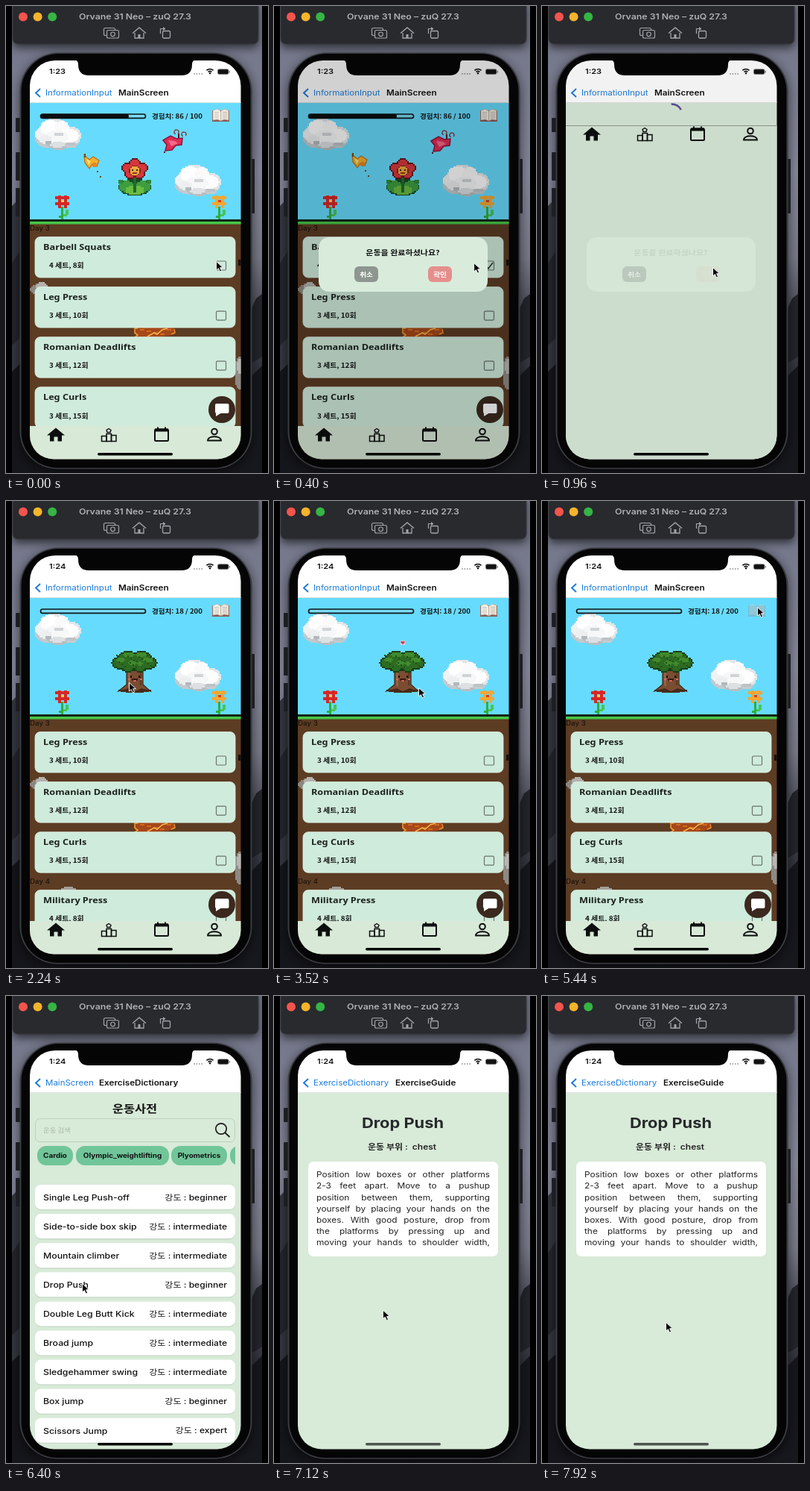
Write an HTML page with a canvas that moves like this. It is 352x626 px and loops after 8000 ms.

```html
<!DOCTYPE html>
<html lang="ko">
<head>
<meta charset="utf-8">
<title>Workout garden</title>
<style>
html, body { margin: 0; width: 100%; height: 100%; overflow: hidden; background: #000; }
canvas { display: block; width: 352px; height: 626px; }
</style>
</head>
<body>
<canvas id="stage" width="352" height="626"></canvas>
<script>
const ctx = document.getElementById('stage').getContext('2d');
const LOOP = 8000, WIDE = 1.15;
const SANS = 'Inter, "Noto Sans CJK KR", "Noto Sans CJK", sans-serif';
const ROUND = '"Noto Sans", "Noto Sans CJK KR", sans-serif';
const KO = '"Noto Sans CJK KR", "Noto Sans CJK", sans-serif';
const MINT = '#d8e9d8';

const clamp = v => Math.max(0, Math.min(1, v));
const ramp = (t, a, b) => clamp((t - a) / (b - a));
const smooth = p => p * p * (3 - 2 * p);
const easeOut = p => 1 - (1 - p) ** 3;

// ---- drawing helpers
function rect(x, y, w, h, c) { ctx.fillStyle = c; ctx.fillRect(x, y, w, h); }

function round(x, y, w, h, r, fill, stroke, lw = 1) {
  ctx.beginPath();
  ctx.roundRect(x, y, w, h, r);
  if (fill) { ctx.fillStyle = fill; ctx.fill(); }
  if (stroke) { ctx.strokeStyle = stroke; ctx.lineWidth = lw; ctx.stroke(); }
}

function disc(x, y, r, c) {
  ctx.beginPath(); ctx.arc(x, y, r, 0, 7); ctx.fillStyle = c; ctx.fill();
}

function poly(pts, fill, stroke, lw = 1, close = true) {
  ctx.beginPath();
  for (let i = 0; i < pts.length; i += 2) ctx.lineTo(pts[i], pts[i + 1]);
  if (close) ctx.closePath();
  if (fill) { ctx.fillStyle = fill; ctx.fill(); }
  if (stroke) { ctx.strokeStyle = stroke; ctx.lineWidth = lw; ctx.stroke(); }
}

function text(s, x, y, size, { w = 400, c = '#111', f = SANS, al = 'left' } = {}) {
  ctx.save();
  ctx.translate(x, y);
  ctx.scale(WIDE, 1);
  ctx.font = `${w} ${size}px ${f}`;
  ctx.textAlign = al;
  ctx.textBaseline = 'middle';
  ctx.fillStyle = c;
  ctx.fillText(s, 0, 0.5);
  ctx.restore();
}

function faded(a, fn) {
  if (a <= 0) return;
  ctx.save(); ctx.globalAlpha *= a; fn(); ctx.restore();
}

function shadowed(blur, fn) {
  ctx.save();
  ctx.shadowColor = 'rgba(0,0,0,0.6)';
  ctx.shadowBlur = blur;
  ctx.shadowOffsetY = 5;
  fn();
  ctx.restore();
}

// Ellipse built from square steps.
function blob(cx, cy, rx, ry, c, s = 2) {
  ctx.fillStyle = c;
  for (let y = -ry; y < ry; y += s) {
    const k = (y + s / 2) / ry;
    const hw = Math.round(rx * Math.sqrt(Math.max(0, 1 - k * k)) / s) * s;
    ctx.fillRect(cx - hw, cy + y, hw * 2, s);
  }
}

// ---- desktop and simulator frame
function desktop() {
  const g = ctx.createLinearGradient(0, 50, 0, 626);
  g.addColorStop(0, '#74778a');
  g.addColorStop(0.3, '#85879a');
  g.addColorStop(0.5, '#777987');
  g.addColorStop(0.62, '#4c4e59');
  g.addColorStop(0.8, '#2b2c34');
  g.addColorStop(1, '#16171c');
  rect(8, 0, 336, 626, g);
  poly([8, 268, 14, 262, 24, 285, 24, 626, 8, 626], '#353740');
  poly([8, 345, 24, 320, 24, 440, 8, 455], '#25262d');
  poly([8, 490, 24, 475, 40, 626, 8, 626], '#15161b');
  poly([328, 410, 336, 392, 344, 386, 344, 470, 328, 480], '#24252c');
  poly([326, 500, 344, 482, 344, 626, 300, 626], '#17181d');
}

function toolbar() {
  shadowed(12, () => round(9, -8, 330, 59, 7, '#282a2e'));
  round(9, -8, 330, 59, 7, null, '#37393e');
  ['#f4544d', '#f6b42c', '#35b544'].forEach((c, i) => disc(23 + i * 19.6, 14.5, 6, c));
  text('Orvane 31 Neo – zuQ 27.3', 173.5, 14, 10.7, { w: 600, c: '#b0b1b5', al: 'center' });
  const ic = '#a3a5aa';
  round(131.5, 29.5, 15, 10, 2, null, ic, 1.2);
  round(135.5, 32.5, 16, 10.5, 2, '#282a2e', ic, 1.2);
  ctx.beginPath(); ctx.arc(143.5, 37.8, 2.8, 0, 7); ctx.stroke();
  poly([170, 36.5, 179, 29, 188, 36.5], null, ic, 1.4, false);
  poly([173, 36, 173, 43, 185, 43, 185, 36], null, ic, 1.3, false);
  rect(177.5, 38, 3, 5, ic);
  round(210.5, 33.5, 10, 9.5, 1.5, null, ic, 1.3);
  poly([207.5, 37, 207.5, 30.5, 213, 30.5], null, ic, 1.2, false);
  poly([211, 28, 214.5, 30.5, 211, 33], ic);
}

function body() {
  const side = '#24262c';
  round(13, 150, 7, 19, 1, side);
  round(13, 196, 7, 38, 1, side);
  round(13, 244, 7, 38, 1, side);
  round(328, 205, 6, 73, 1, side);
  shadowed(16, () => round(18.5, 62.5, 312, 558, [52, 52, 50, 50], '#3a3c42'));
  round(20.5, 64, 308, 555, [50, 50, 48, 48], '#050506');
}

// ---- status bar, title bar
function status(t) {
  text(t < 1480 ? '1:23' : '1:24', 58, 88, 9.6, { w: 600 });
  for (let i = 0; i < 4; i++) disc(253 + i * 3.4, 91, 0.9, '#999');
  ctx.strokeStyle = '#111'; ctx.lineWidth = 1.6;
  for (const r of [3.5, 6.5]) {
    ctx.beginPath(); ctx.arc(274, 91, r, -2.35, -0.8); ctx.stroke();
  }
  disc(274, 90.3, 1.2, '#111');
  round(284.5, 84.8, 14.5, 6.6, 1.8, '#111', '#777', 0.8);
  rect(300, 87, 1, 2.5, '#777');
}

function notch() {
  ctx.beginPath();
  ctx.moveTo(92, 72);
  ctx.quadraticCurveTo(97, 73, 97, 78);
  ctx.quadraticCurveTo(97, 93, 111, 93);
  ctx.lineTo(236, 93);
  ctx.quadraticCurveTo(250, 93, 250, 78);
  ctx.quadraticCurveTo(250, 73, 255, 72);
  ctx.fillStyle = '#050506'; ctx.fill();
}

const HEADS = [
  ['InformationInput', 'MainScreen', 151],
  ['MainScreen', 'ExerciseDictionary', 125],
  ['ExerciseDictionary', 'ExerciseGuide', 163]
];
function head(i, a, dx) {
  const [back, title, x] = HEADS[i];
  faded(a, () => {
    text(back, 53 + dx * 0.6, 116, 10, { c: '#1a7bdc' });
    text(title, x + dx, 116, 10.2, { w: 600 });
  });
}

// ---- garden sprites
function cloud(x, y) {
  blob(x + 16, y + 26, 16, 12, '#c3c9cd');
  blob(x + 32, y + 31, 16, 10, '#b8bec2');
  blob(x + 48, y + 28, 12, 10, '#c6cbce');
  blob(x + 26, y + 13, 20, 14, '#e3e6e8');
  blob(x + 48, y + 22, 14, 12, '#e3e6e8');
  blob(x + 12, y + 20, 12, 10, '#f1f2f3');
  blob(x + 20, y + 11, 13, 10, '#fff');
  blob(x + 36, y + 11, 10, 9, '#fafafa');
  blob(x + 46, y + 22, 13, 9, '#fdfdfd');
  blob(x + 29, y + 24, 16, 9, '#f6f7f7');
  blob(x + 14, y + 27, 9, 6, '#eceeef');
  blob(x + 30, y + 34, 10, 4, '#dde0e2');
  blob(x + 32, y + 20, 6, 2, '#d0d4d6');
  blob(x + 18, y + 31, 5, 2, '#b2b8bc');
  blob(x + 48, y + 33, 6, 2, '#bdc2c5');
}

function bloom(x, c, mid) {
  rect(x - 2, 269, 3, 17, '#2fae3f');
  rect(x + 1, 279, 5, 3, '#49c655');
  rect(x + 4, 273, 4, 7, '#49c655');
  rect(x - 5, 281, 4, 3, '#2fae3f');
  for (const d of [-6, 2]) {
    rect(x + d, 254, 4, 17, c);
    rect(x - 10, 261 + d, 19, 4, c);
  }
  rect(x - 2, 260, 4, 3, mid);
}

function flowerPal() {
  blob(173, 243, 22, 11, '#174a24');
  blob(162, 242, 10, 8, '#3d9d3f');
  blob(184, 242, 10, 8, '#3d9d3f');
  blob(173, 247, 13, 6, '#69bb42');
  rect(151, 233, 6, 5, '#2f8a38'); rect(189, 233, 6, 5, '#2f8a38');
  rect(171, 230, 4, 20, '#1f6c2c');
  for (const [s, c] of [[8, '#641522'], [6, '#d6373b']])
    for (let i = 0; i < 5; i++) {
      const a = -Math.PI / 2 + i * Math.PI * 0.4;
      blob(Math.round(173 + 10 * Math.cos(a)), Math.round(219 + 8 * Math.sin(a)), s, s - 1, c);
    }
  blob(173, 221, 8, 7, '#7d2a1d');
  blob(173, 221, 6, 6, '#f2a541');
  rect(169, 219, 2, 2, '#331'); rect(175, 219, 2, 2, '#331');
  rect(170, 223, 6, 2, '#8b3a20');
}

function insects(t) {
  const b = Math.round(Math.sin(t / 260));
  ctx.save();
  ctx.translate(0, b);
  poly([211, 180, 221, 174, 229, 178, 237, 177, 236, 186, 228, 187, 223, 193, 214, 194, 216, 186], '#e02c56', '#8a1638', 1.5);
  poly([218, 180, 227, 181, 231, 184, 222, 188], '#f36b88');
  ctx.strokeStyle = '#86343b'; ctx.lineWidth = 1.3;
  for (const [x, y] of [[229, 169], [239, 172]]) {
    ctx.beginPath(); ctx.arc(x, y, 3, 2, 7); ctx.stroke();
  }
  rect(231, 171, 2, 6, '#641522');
  rect(212, 195, 2, 2, '#641522');
  ctx.translate(0, -2 * b);
  poly([105, 200, 112, 206, 117, 202, 125, 207, 122, 215, 116, 212, 112, 218, 106, 210], '#f4b02f', '#b8741c', 1.3);
  poly([108, 205, 114, 208, 111, 213], '#ffe07a');
  blob(119, 213, 3, 3, '#e88421', 1);
  rect(105, 198, 2, 5, '#6c4a1e');
  rect(122, 221, 2, 2, '#6c4a1e'); rect(126, 228, 2, 2, '#6c4a1e');
  ctx.restore();
}

function tree() {
  blob(173, 254, 22, 3, '#4a2c1b', 1);
  poly([162, 222, 184, 222, 184, 246, 194, 255, 182, 252, 173, 256, 165, 252, 151, 255, 162, 246], '#7a4d32', '#3c2317', 1.2);
  rect(164, 228, 3, 20, '#93623f'); rect(180, 230, 2, 17, '#5d3822');
  for (const [d, c] of [[0, '#173f17'], [2, '#2d6b22']]) {
    blob(155, 217, 13 - d, 9 - d, c);
    blob(190, 217, 13 - d, 9 - d, c);
    blob(164, 210, 14 - d, 9 - d, c);
    blob(182, 210, 14 - d, 9 - d, c);
    blob(164, 221, 10 - d, 9 - d, c);
    blob(180, 221, 10 - d, 9 - d, c);
  }
  for (const [x, y, r] of [[154, 213, 6], [165, 206, 8], [182, 206, 8], [191, 213, 7], [170, 217, 6], [180, 218, 4]])
    blob(x, y, r, 3, '#418a2c');
  for (let i = 0; i < 18; i++) rect(148 + (i * 23) % 50, 206 + (i * 7) % 17, 2, 2, '#1e5119');
  rect(167, 234, 2, 3, '#1c100b'); rect(178, 234, 2, 3, '#1c100b');
  rect(164, 238, 3, 2, '#c9705c'); rect(180, 238, 3, 2, '#c9705c');
  ctx.beginPath(); ctx.arc(173, 238, 4, 0, Math.PI); ctx.fillStyle = '#3a1712'; ctx.fill();
  rect(171, 240, 4, 2, '#d45f58');
}

function heart(t) {
  const k = smooth(ramp(t, 2480, 2720)) * (1 - smooth(ramp(t, 3280, 3680)));
  if (k < 0.02) return;
  ctx.save();
  ctx.translate(173, 190); ctx.scale(k, k);
  rect(-9, -8, 18, 16, '#e9d3dc');
  rect(-7, -6, 6, 7, '#d8324a'); rect(1, -6, 6, 7, '#d8324a');
  rect(-5, -3, 10, 6, '#d8324a'); rect(-2, 3, 4, 3, '#d8324a');
  ctx.restore();
}

function book() {
  poly([277, 140, 300, 140, 300, 155, 277, 155], '#8d5a55');
  poly([278, 140, 284, 138, 288.5, 141, 288.5, 154, 284, 152, 278, 153], '#f5f1e6', '#b5aaa0', 0.7);
  poly([299, 140, 293, 138, 288.5, 141, 288.5, 154, 293, 152, 299, 153], '#ece6da', '#b5aaa0', 0.7);
  for (let y = 142; y < 151; y += 2.5) {
    rect(280, y, 6, 0.8, '#b9b4ad'); rect(291, y, 6, 0.8, '#b9b4ad');
  }
}

function soil() {
  rect(32, 286, 284, 322, '#5c3c23');
  rect(32, 286, 284, 3, '#14251a');
  rect(32, 289, 284, 3.5, '#46c747');
  blob(46, 380, 14, 8, '#8c8781'); blob(48, 376, 8, 6, '#b5b2ad');
  blob(314, 344, 3, 4, '#17110d');
  blob(314, 492, 7, 22, '#8d8a86'); blob(314, 483, 4, 10, '#b9b7b4');
  blob(84, 521, 10, 4, '#a29e99');
  poly([176, 431, 224, 431, 227, 434, 226, 440, 218, 442, 200, 444, 176, 444, 172, 438], '#a5481a');
  for (let x = 180; x < 222; x += 9) rect(x, 433 + x % 4 * 2, 6, 2, '#d0691f');
  poly([177, 432, 173, 432, 173, 438, 177, 441, 173, 444], null, '#f4a33a', 1.5, false);
  poly([190, 443, 199, 438, 203, 440, 210, 434, 217, 432], null, '#f7b646', 1.5, false);
  poly([226, 433, 227, 438, 222, 440], null, '#e88b2c', 1.5, false);
}

// ---- screens
function card(y, name, note) {
  round(39, y, 269, 54.5, 7, '#cfebdb', '#e0f3e7', 0.8);
  text(name, 50, y + 14, 11, { w: 600, f: ROUND, c: '#1b211d' });
  text(note, 58, y + 38, 8.6, { w: 700, f: KO });
  round(282.5, y + 32.5, 13, 12, 1.5, null, '#68736d', 1.2);
}

const SETS = [
  ['Barbell Squats', '4 세트, 8회'], ['Leg Press', '3 세트, 10회'],
  ['Romanian Deadlifts', '3 세트, 12회'], ['Leg Curls', '3 세트, 15회'],
  ['Military Press', '4 세트, 8회']
];

function tabs(y) {
  rect(32, y, 284, 608 - y, MINT);
  const c = '#0c0f0d', m = y + 11.5;
  poly([55, m + 1, 67, m - 9, 79, m + 1, 75, m + 1, 75, m + 9, 69.5, m + 9, 69.5, m + 3, 64.5, m + 3, 64.5, m + 9, 59, m + 9, 59, m + 1], c);
  ctx.strokeStyle = c; ctx.lineWidth = 1.5;
  ctx.strokeRect(128.5, m + 2, 6.5, 7); ctx.strokeRect(135, m - 1, 6.5, 10);
  ctx.strokeRect(141.5, m + 1, 6.5, 8);
  poly([138, m - 8, 141, m - 6, 140, m - 3, 136, m - 3, 135, m - 6], null, c, 1.4);
  round(200, m - 7, 18, 15.5, 1.5, null, c, 2);
  rect(200, m - 8, 18, 4, c); rect(203, m - 10, 2, 3, c); rect(213, m - 10, 2, 3, c);
  ctx.beginPath(); ctx.arc(280, m - 4, 3.8, 0, 7); ctx.stroke();
  ctx.lineWidth = 1.8;
  ctx.beginPath(); ctx.moveTo(271, m + 8); ctx.lineTo(289, m + 8);
  ctx.bezierCurveTo(289, m + 1, 271, m + 1, 271, m + 8); ctx.closePath(); ctx.stroke();
}

function mainScreen(t) {
  const grown = t >= 1440;
  rect(32, 130, 284, 157, '#67dbfd');
  cloud(39, 152); cloud(227, 214);
  bloom(76, '#d72726', '#f7d05a'); bloom(287, '#f7a62e', '#c7442b');
  if (grown) { tree(); heart(t); }
  else { insects(t); flowerPal(); }
  round(46.5, 145, 141, 5.4, 2.7, '#79d9f2', '#0b1519', 1.7);
  if (!grown) round(47, 145, 118, 5.4, 2.7, '#0b0d0f');
  text(grown ? '경험치: 18 / 200' : '경험치: 86 / 100', 196, 147, 8.3, { w: 700, f: KO });
  faded(t > 5340 && t < 5600 ? 0.22 : 1, book);

  soil();
  ctx.save();
  ctx.beginPath(); ctx.rect(32, 292, 284, 271); ctx.clip();
  text('Day 3', 32, 297.5, 8.5, { c: '#130d08' });
  if (grown) {
    for (let i = 0; i < 3; i++) card(309.5 + i * 67.1, ...SETS[i + 1]);
    text('Day 4', 32, 510, 8.5, { c: '#130d08' });
    card(521.5, ...SETS[4]);
  } else {
    for (let i = 0; i < 4; i++) card(309.5 + i * 67.1, ...SETS[i]);
    if (t > 80) poly([285, 348, 288, 352, 294, 344], null, '#26362c', 1.6, false);
  }
  ctx.restore();
  tabs(563);
  disc(290, 541, 18, '#3b281e');
  round(281, 533, 18.5, 13, 2, '#fff');
  poly([282, 544, 290, 545, 282, 550], '#fff');
}

function loading(t) {
  rect(32, 130, 284, 478, MINT);
  ctx.save();
  ctx.beginPath(); ctx.rect(32, 130, 284, 30); ctx.clip();
  const a = -1.6 + (t - 960) / 1000 * Math.PI * 2;
  const g = ctx.createLinearGradient(160, 146, 188, 146);
  g.addColorStop(0, '#37558f'); g.addColorStop(1, '#6a4c9c');
  ctx.beginPath(); ctx.arc(174, 146, 14.5, a, a + 1.1);
  ctx.strokeStyle = g; ctx.lineWidth = 2.6; ctx.stroke();
  ctx.restore();
  tabs(160);
  rect(32, 160, 284, 0.9, '#879189');
}

const MOVES = [
  ['Single Leg Push-off', 'beginner'], ['Side-to-side box skip', 'intermediate'],
  ['Mountain climber', 'intermediate'], ['Drop Push', 'beginner'],
  ['Double Leg Butt Kick', 'intermediate'], ['Broad jump', 'intermediate'],
  ['Sledgehammer swing', 'intermediate'], ['Box jump', 'beginner'],
  ['Scissors Jump', 'expert']
];

function dictionary(t) {
  rect(32, 130, 284, 478, '#d8ead8');
  text('운동사전', 173, 150, 14.2, { w: 700, al: 'center', f: KO });
  round(39.5, 164.5, 268, 31, 6, null, '#bfd0bf');
  text('운동 검색', 50, 179.5, 8.2, { c: '#a9b8aa', f: KO });
  ctx.strokeStyle = '#1a1d1b'; ctx.lineWidth = 1.7;
  ctx.beginPath(); ctx.arc(289, 178, 7.2, 0, 7); ctx.stroke();
  poly([294, 183, 300.5, 189], null, '#1a1d1b', 1.8, false);
  ctx.save();
  ctx.beginPath(); ctx.rect(39, 199, 269, 30); ctx.clip();
  for (const [s, x, w] of [['Cardio', 42, 48], ['Olympic_weightlifting', 94, 125], ['Plyometrics', 222, 75], ['', 301, 60]]) {
    round(x, 201, w, 26, 12, '#70c599');
    text(s, x + w / 2, 213.5, 8.6, { w: 700, al: 'center' });
  }
  ctx.restore();
  MOVES.forEach(([name, level], i) => {
    const y = 253 + i * 39.1;
    faded(i === 3 && t > 6480 && t < 6720 ? 0.3 : 1, () => {
      round(39, y + 0.8, 269, 33.5, 8, '#c7d8c8');
      round(39, y, 269, 33, 8, '#fff');
      text(name, 50, y + 17, 10.7, { w: 500 });
      text('강도 : ' + level, 297, y + 17, 10.5, { w: 500, al: 'right' });
    });
  });
}

const GUIDE = [
  'Position low boxes or other platforms', '2-3 feet apart. Move to a pushup',
  'position between them, supporting', 'yourself by placing your hands on the',
  'boxes. With good posture, drop from', 'the platforms by pressing up and',
  'moving your hands to shoulder width,'
];

function justify(line, x, y, w, size) {
  const words = line.split(' ');
  ctx.font = `400 ${size}px ${SANS}`;
  const sizes = words.map(s => ctx.measureText(s).width * WIDE);
  const gap = (w - sizes.reduce((a, b) => a + b, 0)) / (words.length - 1);
  words.forEach((s, i) => {
    text(s, x, y, size, { c: '#222' });
    x += sizes[i] + gap;
  });
}

function guide() {
  rect(32, 130, 284, 478, '#d8ead8');
  text('Drop Push', 173, 171, 19, { w: 700, c: '#26292a', al: 'center' });
  text('운동 부위 :  chest', 172, 202, 10.4, { w: 600, c: '#222', al: 'center' });
  round(46, 222, 255, 127, 7, '#fff');
  GUIDE.forEach((s, i) => justify(s, 57, 239.5 + i * 15.2, 233, 10.3));
}

function dialog(t) {
  const a = smooth(ramp(t, 160, 400)) * (1 - ramp(t, 860, 1000));
  if (!a) return;
  faded(a * 0.18, () => rect(32, 72, 284, 536, '#000'));
  faded(a ** 0.35, () => round(60, 310, 227, 73, 14, '#d9ecdc'));
  faded(a ** 2, () => {
    text('운동을 완료하셨나요?', 173, 330, 9.6, { w: 600, f: KO, al: 'center' });
    round(207, 349, 32, 21, 6, '#e58f8c');
    text('확인', 223, 359, 8.4, { w: 600, c: '#fff', f: KO, al: 'center' });
  });
  faded(a ** 0.8, () => round(108, 349, 32, 21, 6, '#8e9690'));
  faded(a ** 0.35, () => text('취소', 124, 359, 8.4, { w: 600, c: '#fff', f: KO, al: 'center' }));
}

function shifted(dx, fn) {
  ctx.save(); ctx.translate(dx, 0); fn(); ctx.restore();
}

function screen(t) {
  ctx.save();
  ctx.beginPath(); ctx.roundRect(32, 73, 283.5, 534.5, [34, 34, 32, 32]); ctx.clip();
  const pages = [() => (t >= 880 && t < 1440 ? loading(t) : mainScreen(t)), () => dictionary(t), guide];
  const p1 = easeOut(ramp(t, 5560, 5980)), p2 = easeOut(ramp(t, 6680, 7120));
  const from = p1 < 1 ? 0 : 1, p = from ? p2 : p1;
  if (p < 1) shifted(-85 * p, pages[from]);
  if (p > 0) shifted(284 * (1 - p), pages[from + 1]);
  rect(32, 72, 284, 58, '#fff');
  rect(32, 129, 284, 1, '#dfe3e3');
  poly([46, 111, 40, 116.5, 46, 122], null, '#1a7bdc', 1.9, false);
  head(from, 1 - clamp(p * 1.4), -70 * p);
  head(from + 1, p, 110 * (1 - p));
  status(t);
  dialog(t);
  round(123, 599, 101, 3.4, 1.7, p2 > 0.5 ? '#4d544e' : '#080a08');
  ctx.restore();
  notch();
}

// time, x, y of the pointer tip
const PATH = [
  [0, 282, 342], [240, 282, 342], [720, 229, 350], [1200, 229, 350], [2000, 165, 243],
  [2640, 165, 243], [3360, 194, 250], [4560, 194, 250], [5280, 289, 142],
  [5600, 289, 142], [6320, 102, 385], [6720, 102, 385], [7360, 166, 437], [8000, 166, 437]
];
function pointer(t) {
  const i = PATH.findIndex(k => k[0] > t), a = PATH[i - 1], b = PATH[i];
  const p = smooth(ramp(t, a[0], b[0]));
  ctx.save();
  ctx.translate(a[1] + (b[1] - a[1]) * p, a[2] + (b[2] - a[2]) * p);
  ctx.lineJoin = 'round';
  poly([0.5, 0.5, 0.5, 12, 3.4, 9.6, 5.4, 14, 7.6, 13, 5.6, 8.8, 9.4, 8.6], '#050505', '#f4f4f4', 1);
  ctx.restore();
}

function draw() {
  const t = performance.now() % LOOP;
  rect(0, 0, 352, 626, '#000');
  ctx.save();
  ctx.beginPath(); ctx.rect(8, 0, 336, 626); ctx.clip();
  desktop();
  body();
  toolbar();
  screen(t);
  pointer(t);
  ctx.restore();
  requestAnimationFrame(draw);
}
draw();
</script>
</body>
</html>
```
